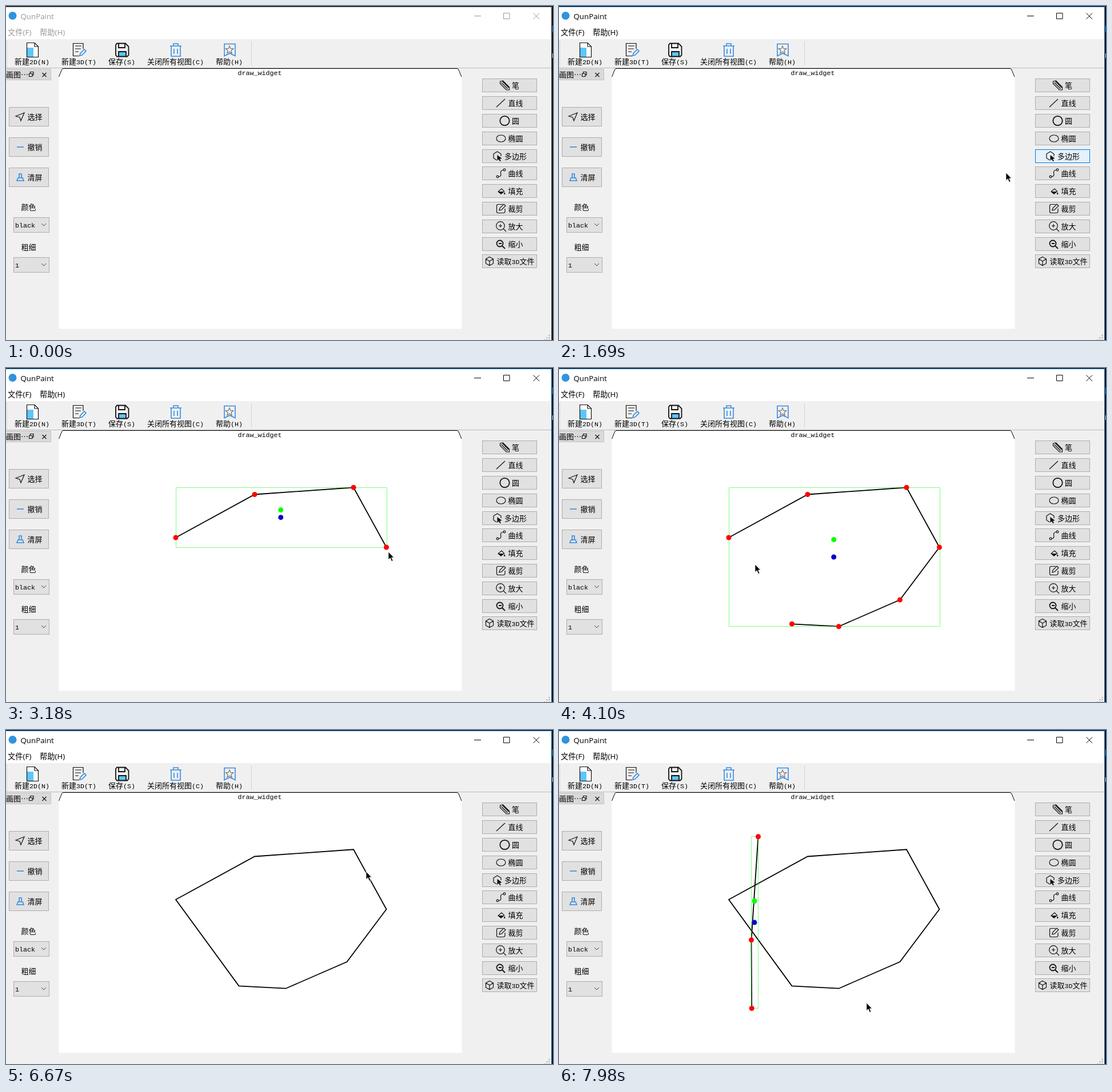
These frames come from a looping animation (957 px wide and 585 px high, 8000 ms). An HTML page:

```html
<!DOCTYPE html>
<html lang="zh-CN">
<head>
<meta charset="utf-8">
<style>
html, body { margin: 0; width: 100%; height: 100%; overflow: hidden; background: #f0f0f0; }
svg { display: block; }
text { font: 13px "Noto Sans CJK SC", "Noto Sans CJK JP", "Noto Sans CJK", sans-serif; white-space: pre; }
.mono { font: 11.67px "Liberation Mono", monospace; }
.title { font: 13.3px "Open Sans", "Noto Sans CJK SC", "Noto Sans CJK", sans-serif; }
.line { fill: none; stroke: #111; stroke-width: 1.2; }
.thick { stroke-width: 1.8; }
.blue { fill: none; stroke: #338be4; stroke-width: 1.6; }
.bar { fill: #999; stroke: #999; }
.active .bar { fill: #000; stroke: #000; }
.bar text { stroke: none; }
#border { fill: none; stroke: #555; }
.active #border { stroke: #1a6fb8; }
.box { fill: #e1e1e1; stroke: #adadad; }
.box.hover { fill: #e5f1fb; stroke: #0078d7; }
.bounds { fill: none; stroke: #0f0; stroke-dasharray: 1 1; stroke-dashoffset: .5; }
.shape { fill: none; stroke: #000; stroke-width: 1.8; }
</style>
</head>
<body>
<svg id="stage" width="957" height="585" viewBox="0 0 957 585">
  <rect width="957" height="585" fill="#10161c"/>
  <path d="M956.5 34V46" stroke="#1f8fe0"/><path d="M956.5 83V91" stroke="#ddd"/>
  <rect y="1" width="955" height="584" fill="#f0f0f0"/>
  <rect y="1" width="955" height="57" fill="#fff"/>
  <path id="border" d="M0 1.500H954.500V585"/>
  <circle cx="11.5" cy="17" r="7" fill="#2f93de"/>
  <g class="bar">
    <text class="title" x="25.5" y="22.5">QunPaint</text>
    <text class="title" x="3" y="51">文件(F)</text>
    <text class="title" x="59" y="51">帮助(H)</text>
    <path fill="none" d="M819 17.500h12M870.500 12.500h10.500v10h-10.500zM922.500 12.500l10.500 10.500M933 12.500l-10.500 10.500"/>
  </g>
  <path d="M0 108.500H954" stroke="#b9b9b9"/>
  <path d="M429.500 62V104" stroke="#d2d2d2"/>
  <path d="M1.500 61V107" stroke="#aaa" stroke-dasharray="1 2"/>
  <path d="M-1 110.500H78.500V129.500H-1Z" fill="#d9d9d9" stroke="#c3c3c3"/>
  <path class="line" d="M40.500 118.500h5.500v5h-5.500zM42.500 118v-2.500h5.500v5.500h-2M63.500 117l7 7M70.500 117l-7 7"/>
  <path d="M92.500 565.500V124L97 113Q98 109.500 100 109.500H789Q791 109.500 792 112L797.500 124V565.500Z" fill="#fff"/>
  <path d="M92.500 124L97 113Q98 109.500 100 109.500H789Q791 109.500 792 112L797 124" fill="none" stroke="#000"/>
  <path d="M950.500 576v9M946.500 580v5M942.500 584v1" stroke="#aaa" stroke-width="2" stroke-dasharray="2 2"/>
  <g id="ui"></g>
  <g id="art"></g>
  <path id="cursor" d="M0 0V13.600L3.200 10.700L5.700 16.500L8 15.500L5.500 9.900H9.600Z" stroke="#fff" stroke-width=".7"/>
</svg>
<script>
const $ = id => document.getElementById(id);
const ui = [];

// Chinese glyphs are 13px wide, everything else 7px
const width = s => [...s].reduce((w, c) => w + (c > '\u2fff' ? 13 : 7), 0);
function label(s, x, y) {
  const body = s.replace(/[ -~]+/g, m => `<tspan class="mono">${m}</tspan>`);
  ui.push(`<text x="${x}" y="${y}">${body}</text>`);
}
const box = (x, y, w, h, id = '') =>
  ui.push(`<rect class="box" id="${id}" x="${x + .5}" y="${y + .5}" width="${w - 1}" height="${h - 1}"/>`);
const icon = (x, y, art) => ui.push(`<g transform="translate(${x} ${y})">${art}</g>`);
const line = (d, more = '') => `<path class="line ${more}" d="${d}"/>`;
const blue = d => `<path class="blue" d="${d}"/>`;
const solid = (d, color = '#111') => `<path d="${d}" fill="${color}"/>`;
const circle = (x, y, r, more = '') => `<circle class="line ${more}" cx="${x}" cy="${y}" r="${r}"/>`;
const dot = (x, y, color) => `<circle cx="${x}" cy="${y}" r="4.5" fill="${color}"/>`;

function star(points, outer, inner) {
  const corners = Array.from({ length: points * 2 }, (_, i) => {
    const a = i * Math.PI / points, r = i % 2 ? inner : outer;
    return [r * Math.sin(a), -r * Math.cos(a)].map(v => v.toFixed(1));
  });
  return `<path d="M${corners.join('L')}Z" fill="none" stroke="#777" stroke-width="1.2"/>`;
}

const toolbar = [
  ['新建2D(N)', 45.5, solid('M-9.500-12.500H4L10.500-6V12.500H-9.500Z', '#fff') + solid('M-9-4H2V12H-9Z', '#5cc6fa') +
    line('M-9.500-12.500H4L10.500-6V12.500H-9.500ZM4-12V-6H10')],
  ['新建3D(T)', 127.5, line('M7-2V-11.500H-10.500V10.500H0M-7-7H4M-7-2H3M-7 3H-1') +
    blue('M1 10L2 6L9-1L12 2L5 9Z')],
  ['保存(S)', 202.5, solid('M-6 3H7V11H-6Z', '#5cc6fa') +
    line('M-9-11.500H6L11.500-6V9L9 11.500H-9L-11 9V-9ZM-6-11V-4H5V-11M-6 11V3H7V11', 'thick')],
  ['关闭所有视图(C)', 296.5, blue('M-10-7H10M-4-7V-11H4V-7M-8-7V11H8V-7M-3-2V7M3-2V7')],
  ['帮助(H)', 390.5, blue('M-9-10.500H10V10.500L.5 6L-9 10.500Z') + star(5, 7, 3.2)]
];
for (const [name, x, art] of toolbar) {
  icon(x + .5, 77, art);
  label(name, x - width(name) / 2, 102);
}

const tools = [
  ['笔', line('M-8-7L-3-8L8 3V8H3L-8-3ZM-6-5L5 6M-4-7L7 4')],
  ['直线', line('M-8 7L7-7')],
  ['圆', circle(0, 0, 8.2, 'thick')],
  ['椭圆', '<ellipse class="line" rx="8" ry="6"/>'],
  ['多边形', line('M-1 7L-6.500 3.500V-4L0-8L6.500-4V0') + solid('M0-2L8 4L4.500 5L6.500 8.500L4.500 9L2.500 5.500L0 8Z')],
  ['曲线', circle(-6, 6, 1.8) + circle(6, -6, 1.8) + line('M-4 6C5 5-6-4 4-6')],
  ['填充', line('M-5 1L1-4L6 1') + solid('M-6 1H6L0 6ZM6 2Q9 6 6 6Q4 6 6 2')],
  ['裁剪', line('M3-7.500H-5Q-7.500-7.500-7.500-5V5Q-7.500 7.500-5 7.500H4Q7 7.500 7 5V0M-3 3L-2-1L5-8L8-5L1 2Z')],
  ['放大', circle(-1, -1, 7.3) + line('M4 4L9 9M-4-1H2M-1-4V2')],
  ['缩小', circle(-2, -1, 5.5, 'thick') + line('M2 3L7 8M-4-1H1', 'thick')],
  ['读取3D文件', line('M0-7.500L6.500-4V4L0 7.500L-6.500 4V-4ZM-6.500-4L0 0L6.500-4M0 0V7')]
];
tools.forEach(([name, art], i) => {
  const y = Math.round(127.3 + 30.81 * i), x = 891.5 - width(name) / 2;
  box(833, y, 96, 24, 'tool' + i);
  icon(x - 12.5, y + 12, art);
  label(name, x, y + 17);
});

const actions = [
  ['选择', line('M-8-1L7-7L1 7L-1 1Z')],
  ['撤销', blue('M-6 0H6')],
  ['清屏', blue('M-6 6L-4 1H4L6 6ZM-2 1V-6H2V1')]
];
actions.forEach(([name, art], i) => {
  const y = 177 + 53 * i;
  box(5, y, 70, 34);
  icon(25, y + 17, art);
  label(name, 37.5, y + 22);
});
[['颜色', 'black'], ['粗细', '1']].forEach(([name, value], i) => {
  const y = 370 + 70 * i;
  label(name, 26.5, y - 13);
  box(13, y, 63, 27);
  label(value, 16, y + 17.5);
  icon(66, y + 13, '<path d="M-4-2L0 2L4-2" fill="none" stroke="#444"/>');
});
label('画图…', 0, 125);
label('draw_widget', 405.5, 121);
$('ui').innerHTML = ui.join('');

// The screen refreshes every TICK ms; key points are [refresh, x, y]
const TICK = 77.5, LOOP = 8000, LAST = 103;
const ACTIVATE = 18, CLOSE = 69, DESELECT = 84;

const first = [[28, 297, 297], [31, 435, 221.5], [36, 608, 209.3], [40, 665.5, 314],
  [44, 596.5, 406], [47, 489.5, 452.7], [50, 407.5, 448.3]];
const second = [[93, 348.5, 186.7], [97, 336.5, 367.7], [100, 337.2, 487.5]];

// The pointer visits every vertex it clicks, with a few stops between
const stops = [
  [1, 861, 532], [5, 825, 370], [10, 852, 262], [12, 866, 226], [16, 869, 264], [19, 867, 265],
  [22, 782, 292], [26, 297, 297], [41, 669, 322], [53, 343, 344], [60, 298, 303], [71, 298, 304],
  [75, 463, 312], [82, 685, 256], [84, 715, 248], [86, 630, 248], [91, 350, 190], [LAST, 538, 478],
  ...first, ...second
].sort((a, b) => a[0] - b[0]);

function pointer(n) {
  const i = Math.max(1, stops.findIndex(s => s[0] >= n));
  const [t0, x0, y0] = stops[i - 1], [t1, x1, y1] = stops[i];
  const k = (n - t0) / (t1 - t0);
  return [x0 + (x1 - x0) * k, y0 + (y1 - y0) * k];
}

function polygon(vertices, n, closeAt = Infinity, doneAt = Infinity) {
  const pts = vertices.filter(v => v[0] <= n).map(v => v.slice(1));
  if (!pts.length) return '';
  const outline = `<path class="shape" d="M${pts.join('L')}${n >= closeAt ? 'Z' : ''}"/>`;
  if (n >= doneAt) return outline;
  const xs = pts.map(p => p[0]), ys = pts.map(p => p[1]);
  const x = Math.min(...xs), y = Math.min(...ys);
  const w = Math.max(...xs) - x, h = Math.max(...ys) - y;
  const cx = x + w / 2 - .5, cy = y + h / 2;
  return outline +
    `<rect class="bounds" x="${Math.floor(x) + .5}" y="${Math.floor(y) + .5}" width="${Math.round(w)}" height="${Math.round(h)}"/>` +
    pts.map(p => dot(...p, '#f00')).join('') +
    dot(cx, cy, '#00c') + dot(cx, cy - h / 8, '#0f0');
}

function draw(n) {
  const [x, y] = pointer(n);
  $('cursor').setAttribute('transform', `translate(${x} ${y})`);
  $('cursor').style.display = n ? '' : 'none';
  $('stage').classList.toggle('active', n >= ACTIVATE);
  const overEllipse = n >= 11 && n <= 13;
  $('tool3').classList.toggle('hover', overEllipse);
  $('tool4').classList.toggle('hover', n >= 10 && n < 24 && !overEllipse);
  $('art').innerHTML = polygon(first, n, CLOSE, DESELECT) + polygon(second, n);
}

const start = performance.now();
let shown = -1;
function loop() {
  const t = (performance.now() - start) % LOOP;
  const n = Math.min(LAST, Math.floor((t + 30) / TICK));
  if (n !== shown) draw(shown = n);
  requestAnimationFrame(loop);
}
loop();
</script>
</body>
</html>
```
